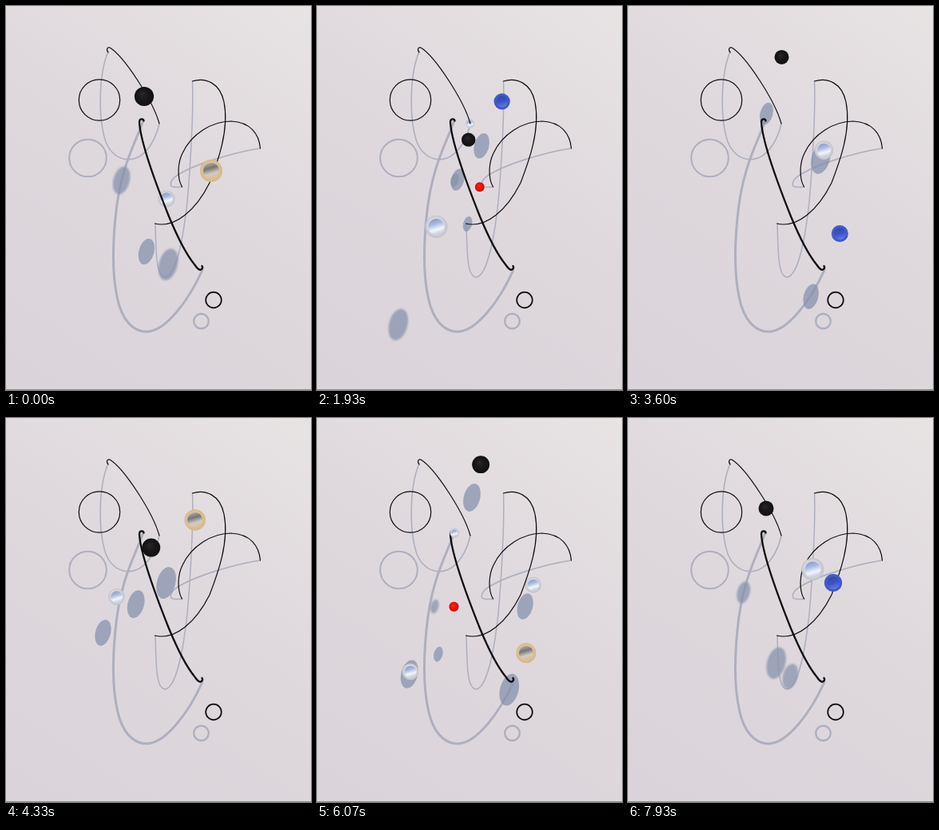
An HTML page with a canvas that plays this animation: 382x480 px, repeating every 8 s.

```html
<!DOCTYPE html>
<html lang="en">
<head>
<meta charset="utf-8">
<title>Wire mobile</title>
<style>
html, body { margin: 0; width: 100%; height: 100%; overflow: hidden; background: #ded8dd; }
canvas { display: block; width: 382px; height: 480px; }
</style>
</head>
<body>
<canvas id="stage"></canvas>
<script>
const W = 382, H = 480, LOOP = 8, CYCLE = 5.067, SECOND = 2.863;
const AIRTIME = 1.27; // seconds from launch to the top of a flight
const POP = .1;       // seconds to grow or shrink
const canvas = document.getElementById('stage');
const ratio = window.devicePixelRatio || 1;
canvas.width = W * ratio;
canvas.height = H * ratio;
const ctx = canvas.getContext('2d');

const wire = (d, width) => ({ path: new Path2D(d), width });
const ring = (x, y, r, width) =>
  wire(`M${x - r} ${y}a${r} ${r} 0 1 1 ${2 * r} 0a${r} ${r} 0 1 1 ${-2 * r} 0`, width);

const wires = [
  wire('M128 58C125 54 127 51 130 52C148 63 184 118 192 147', 1.2),
  ring(117, 117.5, 25.7, 1.2),
  wire('M172.5 143.5C172 140 167 141 167 145C168 165 184 213 204 263C214 287 227 312 236 323C240 329 243 331 245 329Q247 327 245.5 325', 2.3),
  wire('M233.5 94C250 89 268 96 273 120C280 155 265 195 255 221C238 255 212 278 186.5 272', 1.2),
  wire('M220.5 226C214 215 215 196 221 184C232 160 258 144 282 144C306 145 317 160 318.5 178', 1.2),
  ring(260, 367.5, 9.8, 1.7)
];
const wireShadows = [
  wire('M128 57C116 85 115 140 125 170C133 190 150 195 163 190C178 184 188 165 192 147', 1.6),
  ring(102.5, 190, 23.3, 2),
  wire('M172 143C163 170 143 200 137 265C133 305 133 345 142 375C150 400 165 408 178 407C200 405 228 370 246 330', 3),
  wire('M233.5 94C235 130 231 200 227 245C222 290 213 338 199 339C188 338 188 310 187 272', 1.5),
  wire('M318 178C285 183 235 198 214 212C206 217 204 225 209 226Q215 227 221 226', 1.6),
  ring(244.5, 394, 9.3, 2.4)
];

// A flight swings through its centre while bending; peak is the height over the wall
const flight = (center, swing, bend, peak, lean) => ({ center, swing, bend, peak, lean });
const rise = flight([173, 113], [6, -55], [26, 0], 105, .27);
const drop = flight([257, 206], [16, 88], [-11, 0], 117, .46);
const cross = flight([201, 241], [70, 0], [0, -32], 66, .38);
const sweep = flight([189, 233], [64, -68], [-5, 10], 138, .39);
const redHop = flight([184, 239], [30, 2], [-12, -33], 62, .33);
const pearlHop = flight([174, 138], [9, -8], [23, 36], 96, .27);

const ball = (look, r, path, top, rest = .18) => ({ look, r, path, top, rest });
const balls = [
  ball('black', 10.2, rise, 0),
  ball('gold', 11.6, drop, 0),
  ball('glass', 9.5, cross, 0),
  ball('red', 5.5, redHop, AIRTIME, 0),
  ball('glass', 5, pearlHop, AIRTIME, 0),
  ball('black', 8, rise, SECOND),
  ball('blue', 9.2, drop, SECOND),
  ball('glass', 11.5, sweep, SECOND - .5)
];

const looks = {
  black: { rim: ['#2b2829', '#1a1819', '#111'] },
  red: { rim: ['#ff2a1e', '#f5100c', '#d40a0a'] },
  blue: { rim: ['#6f88ea', '#4a63d6', '#3c55c4'], core: ['#3349ac', '#3b53c2', '#647ee8'] },
  glass: { rim: ['#f4f5fa', '#e8e8ee', '#c0c0ca'], core: ['#8d9dc6', '#a9bbe2', '#f3f5fb', '#c3c6d2'] },
  gold: { rim: ['#efe2cd', '#e0c8a2', '#d6b888'], core: ['#b3aca4', '#77757a', '#d3cbc2', '#d9bd90'] }
};

const clamp = (v, lo = 0, hi = 1) => Math.max(lo, Math.min(hi, v));

function pose({ center, swing, bend, peak }, time) {
  const t = clamp(time, -AIRTIME, AIRTIME);
  const s = Math.sin(Math.PI / 2 * clamp(t / 1.05, -1, 1));
  const [x, y] = center.map((c, i) => c + swing[i] * s + bend[i] * t * t);
  return { x, y, z: 3 + (peak - 3) * (1 - (t / AIRTIME) ** 2) };
}

function visibleBalls(phase) {
  const shown = [];
  for (const b of balls) {
    let t = phase - b.top;
    t -= CYCLE * Math.round(t / CYCLE);
    const size = clamp((AIRTIME + b.rest - Math.abs(t)) / POP);
    if (size) shown.push({ ...b, ...pose(b.path, t), r: b.r * size });
  }
  return shown.sort((a, b) => a.z - b.z);
}

function strokeAll(list, color) {
  ctx.strokeStyle = color;
  for (const { path, width } of list) {
    ctx.lineWidth = width;
    ctx.stroke(path);
  }
}

function drawShadow({ x, y, z, r, path }) {
  ctx.filter = `blur(${(.4 + z / 200) * ratio}px)`;
  ctx.fillStyle = 'rgba(134,145,172,.73)';
  ctx.beginPath();
  ctx.ellipse(x - z * path.lean, y + z, r, r * 1.75, .26, 0, Math.PI * 2);
  ctx.fill();
  ctx.filter = 'none';
}

function disc(x, y, r, fill, colors) {
  colors.forEach((c, i) => fill.addColorStop(i / (colors.length - 1), c));
  ctx.fillStyle = fill;
  ctx.beginPath();
  ctx.arc(x, y, r, 0, Math.PI * 2);
  ctx.fill();
}

function drawBall({ look, x, y, z, r }) {
  const { rim, core } = looks[look];
  const near = r * (1 + z / 560), inner = near * .72;
  disc(x, y, near, ctx.createRadialGradient(x - near * .2, y - near * .3, 0, x, y, near), rim);
  if (core) {
    const tilt = inner * .3;
    disc(x, y, inner, ctx.createLinearGradient(x - tilt, y - inner, x + tilt, y + inner), core);
  }
}

function drawWall() {
  const g = ctx.createLinearGradient(W, 0, 60, H);
  g.addColorStop(0, '#e8e3e3');
  g.addColorStop(.45, '#dfd9de');
  g.addColorStop(1, '#dad4da');
  ctx.fillStyle = g;
  ctx.fillRect(0, 0, W, H);
  ctx.fillStyle = '#918d93';
  ctx.fillRect(0, H - 1, W, 1);
}

function draw(now) {
  const phase = (now / 1000 % LOOP) % CYCLE;
  const shown = visibleBalls(phase);
  const inFront = b => b.z > 75;
  ctx.setTransform(ratio, 0, 0, ratio, 0, 0);
  ctx.lineCap = 'round';
  drawWall();
  ctx.filter = `blur(${.4 * ratio}px)`;
  strokeAll(wireShadows, '#aeafbe');
  ctx.filter = 'none';
  shown.forEach(drawShadow);
  shown.filter(b => !inFront(b)).forEach(drawBall);
  strokeAll(wires, '#0c0b0c');
  shown.filter(inFront).forEach(drawBall);
}

let origin;
function tick(now) {
  origin ??= now;
  draw(now - origin);
  requestAnimationFrame(tick);
}
draw(0);
requestAnimationFrame(tick);
</script>
</body>
</html>
```
